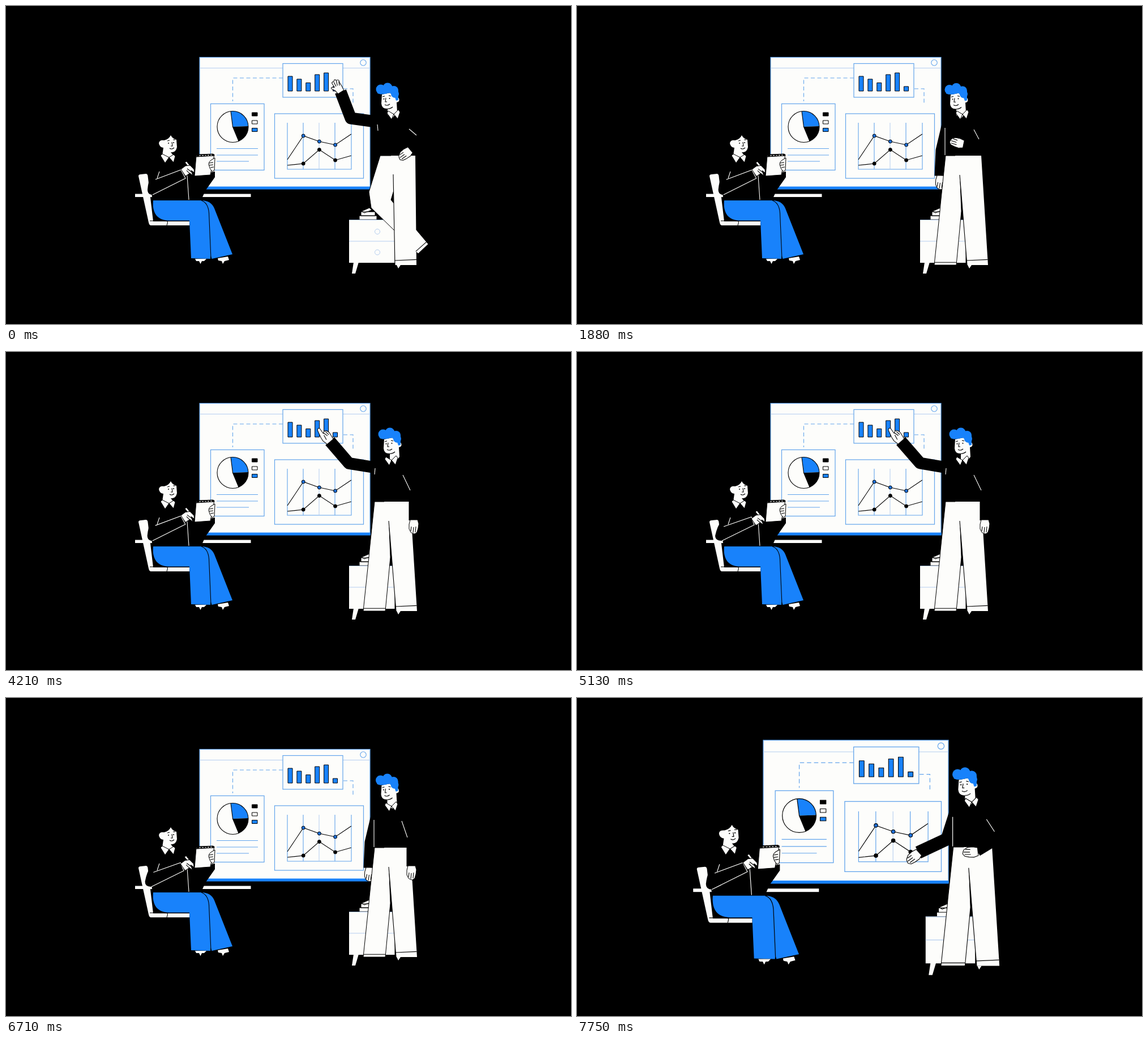
Write an HTML page that moves like this. It is 998 px wide and 561 px high and loops after 7.79 s.

```html
<!DOCTYPE html>
<html lang="en">
<head>
<meta charset="utf-8">
<title>Chart presentation</title>
<style>
html, body { margin: 0; width: 100%; height: 100%; overflow: hidden; background: #000; }
svg { display: block; width: 100vw; height: 100vh; }
.white { fill: #fdfdfb; }
.blue { fill: #1882fb; }
.ink { fill: none; stroke: #000; stroke-width: 1.1; }
.chalk { fill: none; stroke: #fdfdfb; stroke-width: 1.1; }
.edge { stroke: #000; stroke-width: 1; stroke-linejoin: round; }
.card { fill: #fdfdfb; stroke: #62a4ec; stroke-width: 1.2; }
.thin { fill: none; stroke: #62a4ec; stroke-width: 1.1; }
.pale { fill: none; stroke: #b4cdf0; stroke-width: 1; }
.sleeve { fill: none; stroke: #000; stroke-linejoin: round; }
</style>
</head>
<body>
<svg viewBox="0 0 998 561">
<g id="scene">
  <g id="board">
    <rect class="card" x="342" y="90.500" width="301" height="232"/>
    <path class="pale" d="M342 109.500H643"/>
    <rect class="blue" x="342" y="318.500" width="301.500" height="5"/>
    <circle class="thin" cx="631" cy="100" r="5.200"/>
    <path class="thin" stroke-dasharray="7 4.500" d="M489 127H400.500V168M596 146H613V172"/>
    <rect class="card" x="489" y="101.500" width="106" height="59.500"/>
    <g id="bars"></g>
    <rect class="card" x="361.500" y="172.500" width="94.500" height="117"/>
    <circle class="white" cx="400.500" cy="213" r="27.500"/>
    <path class="blue" d="M400.500 213L397 185.700A27.500 27.500 0 0 1 428 212Z"/>
    <path d="M400.500 213L428 212A27.500 27.500 0 0 1 411 238.400Z"/>
    <circle class="ink" cx="400.500" cy="213" r="27.500"/>
    <path class="ink" d="M397 185.700L400.500 213L411 238.400"/>
    <rect class="edge" x="434.500" y="188" width="9.500" height="6"/>
    <rect class="white edge" x="434.500" y="202" width="9.500" height="6"/>
    <rect class="blue edge" x="434.500" y="215.500" width="9.500" height="6"/>
    <path class="thin" d="M372 251.500H445M372 263H445M372 274H429"/>
    <rect class="card" x="474.500" y="190" width="157" height="114"/>
    <path class="thin" d="M497 206V288H610V206M525 206V288M581 206V288"/>
    <path class="pale" d="M553 206V288"/>
    <g id="plots"></g>
  </g>

  <g id="drawers">
    <path class="white" d="M614 452H623L617 472H611ZM690 457H697L693 463Z"/>
    <path class="white edge" d="M624 370H655V377H624ZM627 363H652V370H627ZM628 362L642 356L646 360L633 365Z"/>
    <rect class="white" x="606" y="377" width="80.500" height="76"/>
    <path class="pale" d="M606 415H686M606 377.500H686"/>
    <circle class="pale" cx="656" cy="398" r="4.500"/>
    <circle class="pale" cx="656" cy="434.500" r="4.500"/>
  </g>

  <g id="woman">
    <rect class="white" x="228" y="331.500" width="204.500" height="5.500"/>
    <path class="white" d="M234 300Q234 297 238 297L247 296Q250 296 250.500 300L260 380H324V387H256Q253 387 252 382Z"/>
    <path class="ink" d="M254 379H324M284 387Q286 383 285 379"/>
    <path d="M271 274Q255 282 253 300L259 344H344L352 326L369 302V292L334 299L314 274L298 268Z"/>
    <path class="white" d="M270 242Q271 236 279 237Q288 235 291 228Q294 234 301 236L302 249Q300 259 291 258L296 264L288 268L276 264L278 250Q271 249 270 242Z"/>
    <path class="white edge" d="M276 261L288 267L281 277L273 264ZM288 267L296 262L299 265L296 276Z"/>
    <path class="ink" stroke-width=".8" d="M285 238L289 237M295 236L299 236M293 240L294 247L291 247M289 251Q293 254 297 250"/>
    <circle cx="287" cy="242" r="1"/><circle cx="296" cy="241" r="1"/>
    <path class="chalk" d="M271 292L267 304M320 299L323 342"/>
    <path class="blue" d="M260 343H345Q362 343 368 357L400 438L363.500 446L361.500 440L361 446L327 445L324 378.500H288C266 378 258 364 260 343Z"/>
    <path class="ink" d="M345 343Q357 347 358.500 365L362 446"/>
    <path class="white" d="M334 446H354L350 450L346 450L343.500 455L341 450H336ZM374 445L392 442L394 448L386 450L383 455L381 450L375 449Z"/>
    <path class="white edge" d="M336 264L368 262L361 298L333 300Z"/>
    <path class="edge" d="M336 266L340 262L366 261L368 264Z"/>
    <path class="chalk" d="M341 264L364 263" stroke-dasharray="3 2"/>
    <path class="white edge" d="M369 268L362 272Q358 275 358 279L360 286L364 292L368 290Z"/>
    <path class="ink" d="M359 277L366 276M359 281L366 280M361 285L367 284"/>
    <path id="writingSleeve"/>
    <path id="writingSeam" class="chalk"/>
    <g id="writingHand">
      <path class="white edge" d="M316 276L319 274L333 292L330 293Z"/>
      <path class="white edge" d="M309 288L317 282L325 281L332 288L333 294L327 290L330 299L325 295L317 300Z"/>
      <path class="ink" d="M320 287L328 293M319 290L325 296"/>
    </g>
  </g>

  <g id="man">
    <path id="leftSleeve" class="sleeve" stroke-width="21"/>
    <g id="leftHand"></g>
    <path id="torso"/>
    <path id="farLeg" class="white edge"/>
    <path id="nearLeg" class="white"/>
    <path id="legLines" class="ink"/>
    <path id="rightSleeve" class="sleeve" stroke-width="17"/>
    <g id="rightHand"></g>
    <path id="folds" class="chalk"/>
    <g id="head">
      <path class="white" d="M668 154L667 170Q668 180 678 179V190L687 195L695 185L694 168Q700 167 698 161L688 150Z"/>
      <path class="ink" d="M678 179.500Q684 179 687 176"/>
      <g class="blue">
        <circle cx="666" cy="145" r="8.500"/><circle cx="678" cy="142" r="8.500"/>
        <circle cx="689" cy="147" r="8"/><circle cx="691" cy="153" r="7"/>
        <path d="M660 147H697V164L693 165L690 156Q684 150 678 152Q668 155 660 152Z"/>
      </g>
      <path class="ink" stroke-width=".8" d="M669 158L673 157M680 156L684 157M675 160L674 167L677 167M673 172Q678 175 682 171"/>
      <circle cx="671.500" cy="162" r="1"/><circle cx="681.500" cy="161" r="1"/>
    </g>
    <path id="collar" class="white edge" d="M671 185L681 191L677 200L669 189ZM681 191L689 183L692 187L688 199Z"/>
  </g>
</g>
</svg>
<script>
const LOOP = 7790;
const $ = id => document.getElementById(id);
const set = (id, attrs) => Object.entries(attrs).forEach(([k, v]) => $(id).setAttribute(k, v));
const mix = (a, b, k) => a + (b - a) * k;
const mixAll = (a, b, k) => a.map((v, i) => mix(v, b[i], k));
const line = p => p.reduce((d, v, i) => d + (i % 2 ? " " : i ? "L" : "M") + v.toFixed(2), "");

$("bars").innerHTML = [124, 129, 135.5, 121, 118, 142].map((y, i) =>
  `<rect class="blue edge" x="${498 + i * 15.9}" y="${y}" width="8" height="${150 - y}"/>`).join("");

const plot = (ys, fill) => {
  const pts = ys.map((y, i) => [497 + i * 28.2, y]);
  return `<path class="ink" d="${line(pts.flat())}"/>` + pts.slice(1, 4).map(([x, y]) =>
    `<circle class="edge" cx="${x}" cy="${y}" r="3" fill="${fill}"/>`).join("");
};
$("plots").innerHTML = plot([271, 229, 239, 245, 226], "#1d6fd8") + plot([281, 278, 253.5, 272, 264], "#000");

// Hands start at the wrist and point along +x.
const HANDS = {
  open: ["M-1-6L6-7L13-11Q16-10 14-8L12-5L21-5Q23-3 21-1L23 1Q24 3 21 4L20 7Q18 9 15 7L7 7L-1 6Z",
    "M12-2L20-1M12 1L21 4M10 4L17 7"],
  point: ["M-1-7L8-9L15-8L29-4Q32-1 29 1L18 0L20 4Q19 9 11 9L-1 7Z",
    "M10 3L18 1M10 6L18 5M6-3L15-1"],
  rest: ["M-1-7L6-9L14-8L21-6L24-2L23 2L21 5L15 8L7 8L-1 6Z",
    "M11-4L21-3M12 0L22 1M11 4L19 5"]
};
const showHand = (id, type, x, y, angle) => {
  const [shape, lines] = HANDS[type];
  $(id).innerHTML = `<path class="white edge" d="${shape}"/><path class="ink" d="${lines}"/>`;
  set(id, { transform: `translate(${x} ${y}) rotate(${angle * 180 / Math.PI})` });
};

// Arms list elbow, wrist; turn bends each hand at the wrist (radians);
// folds list both torso lines; lean crosses the legs.
const hangLeft = [644, 255, 642, 300], sideFold = [650, 215, 650, 263];
const POSES = {
  wave: { left: [609, 198, 591, 151], right: [727, 236, 713, 254], turn: [-.2, .2], head: [-4, 2], lean: [1],
    folds: [656, 209, 657, 220, 712, 217, 725, 228], hands: ["open", "rest"] },
  explain: { left: hangLeft, right: [716, 250, 682, 243], turn: [0, 0], head: [-8, 2.5], lean: [0],
    folds: [...sideFold, 701, 218, 710, 235], hands: ["rest", "rest"] },
  pointLow: { left: [604, 213, 580, 171], right: [720, 255, 720, 297], turn: [0, 0], head: [0, 0], lean: [0],
    folds: [652, 205, 651, 216, 701, 217, 714, 244], hands: ["point", "rest"] },
  pointHigh: { left: [606, 196, 572, 157], right: [720, 255, 720, 297], turn: [0, 0], head: [0, 0], lean: [0],
    folds: [652, 205, 651, 216, 701, 217, 714, 244], hands: ["point", "rest"] },
  stand: { left: hangLeft, right: [716, 255, 716, 297], turn: [0, 0], head: [-4.5, 0], lean: [0],
    folds: [...sideFold, 699, 217, 709, 246], hands: ["rest", "rest"] },
  present: { left: [641, 251, 594, 273], right: [721, 252, 690, 271], turn: [-.3, .45], head: [-8, 1], lean: [0],
    folds: [...sideFold, 705, 219, 718, 239], hands: ["rest", "rest"] }
};
// Each move: start, end, pose reached.
const MOVES = [[700, 1500, "explain"], [2300, 3100, "pointLow"], [3500, 4300, "pointHigh"],
  [5200, 5920, "stand"], [7140, 7740, "present"]];

const SHOULDERS = { left: [656, 204.5], right: [706, 210] };
const polar = (x0, y0, x, y) => {
  const a = Math.atan2(y - y0, x - x0);
  return [a < -0.2 ? a + 2 * Math.PI : a, Math.hypot(x - x0, y - y0)];
};
const step = (x, y, [a, r]) => [x + r * Math.cos(a), y + r * Math.sin(a)];

function drawArm(side, from, to, k, hand, turn) {
  const s = SHOULDERS[side];
  const [p, q] = [from[side], to[side]];
  const elbow = step(...s, mixAll(polar(...s, p[0], p[1]), polar(...s, q[0], q[1]), k));
  const fore = mixAll(polar(...p), polar(...q), k);
  const wrist = step(...elbow, fore);
  set(side + "Sleeve", { d: line([...s, ...elbow, ...wrist]) });
  showHand(side + "Hand", hand, ...wrist, fore[0] + turn);
}

function drawLegs(lean) {
  const far = mixAll([651, 264, 642, 350, 641, 362, 631, 457, 670, 457, 679, 362, 677, 310, 690, 264],
    [661, 264, 641, 328, 645, 356, 728, 437, 746, 420, 680, 342, 686, 322, 690, 264], lean);
  const near = mixAll([668, 264, 714, 264, 726, 457, 689, 457, 676, 298],
    [680, 264, 723, 264, 725, 457, 687, 457, 684, 297], lean);
  const hem = (a, b, c, d) => line([...mixAll(a, b, .95), ...mixAll(c, d, .95)]);
  set("farLeg", { d: line(far) + "Z" });
  set("nearLeg", { d: line(near) + "Z" });
  set("legLines", { d: line([...near.slice(8), ...near.slice(6, 8)])
    + hem(near.slice(8), near.slice(6, 8), near.slice(2, 4), near.slice(4, 6))
    + hem(far.slice(4, 6), far.slice(6, 8), far.slice(10, 12), far.slice(8, 10)) });
  set("torso", { d: line(mixAll([655, 195, 672, 188, 693, 188, 712, 206, 714, 264, 651, 264],
    [655, 195, 676, 188, 697, 188, 716, 206, 723, 264, 661, 264], lean)) + "Z" });
  set("collar", { transform: `translate(${4 * lean} 0)` });
}

function drawMan(t) {
  let from = POSES.wave, to = from, k = 0;
  for (const [start, end, name] of MOVES) {
    if (t < start) break;
    from = to;
    to = POSES[name];
    k = Math.min(1, (t - start) / (end - start));
  }
  k = (1 - Math.cos(Math.PI * k)) / 2;
  const hands = (k < .5 ? from : to).hands;
  const turn = mixAll(from.turn, to.turn, k);
  drawArm("left", from, to, k, hands[0], turn[0]);
  drawArm("right", from, to, k, hands[1], turn[1]);
  drawLegs(mix(from.lean[0], to.lean[0], k));
  const f = mixAll(from.folds, to.folds, k);
  set("folds", { d: line(f.slice(0, 4)) + line(f.slice(4)) });
  set("head", { transform: `translate(${mixAll(from.head, to.head, k)})` });
}

function drawWriting(t) {
  const w = (1 + Math.cos((t - 1050) * Math.PI / 1000)) / 2;
  const inner = [264 - 5 * w, 306 + 2 * w], cuffTop = [309 - w, 289 + 2 * w];
  const cuffLow = [317 - 4 * w, 304 + w], low = [259 - 3 * w, 333];
  const elbow = [250 - 6 * w, 324];
  set("writingSleeve", { d: `M264 288Q${252 - 3 * w} 300 ${elbow}Q${elbow[0]} 333 ${low}L${cuffLow}L${cuffTop}L${inner}Z` });
  set("writingSeam", { d: line([...inner, ...cuffTop, ...cuffLow, ...low]) });
  set("writingHand", { transform: `translate(${-w} ${6 * w})` });
}

function draw(t) {
  const zoom = 1 + Math.max(0, t - 6850) * .0000957;
  set("scene", { transform: `translate(492.5 277) scale(${zoom}) translate(-492.5 -277)` });
  drawWriting(t);
  drawMan(t);
}

const origin = performance.now();
function tick() {
  draw((performance.now() - origin) % LOOP);
  requestAnimationFrame(tick);
}
tick();
</script>
</body>
</html>
```
